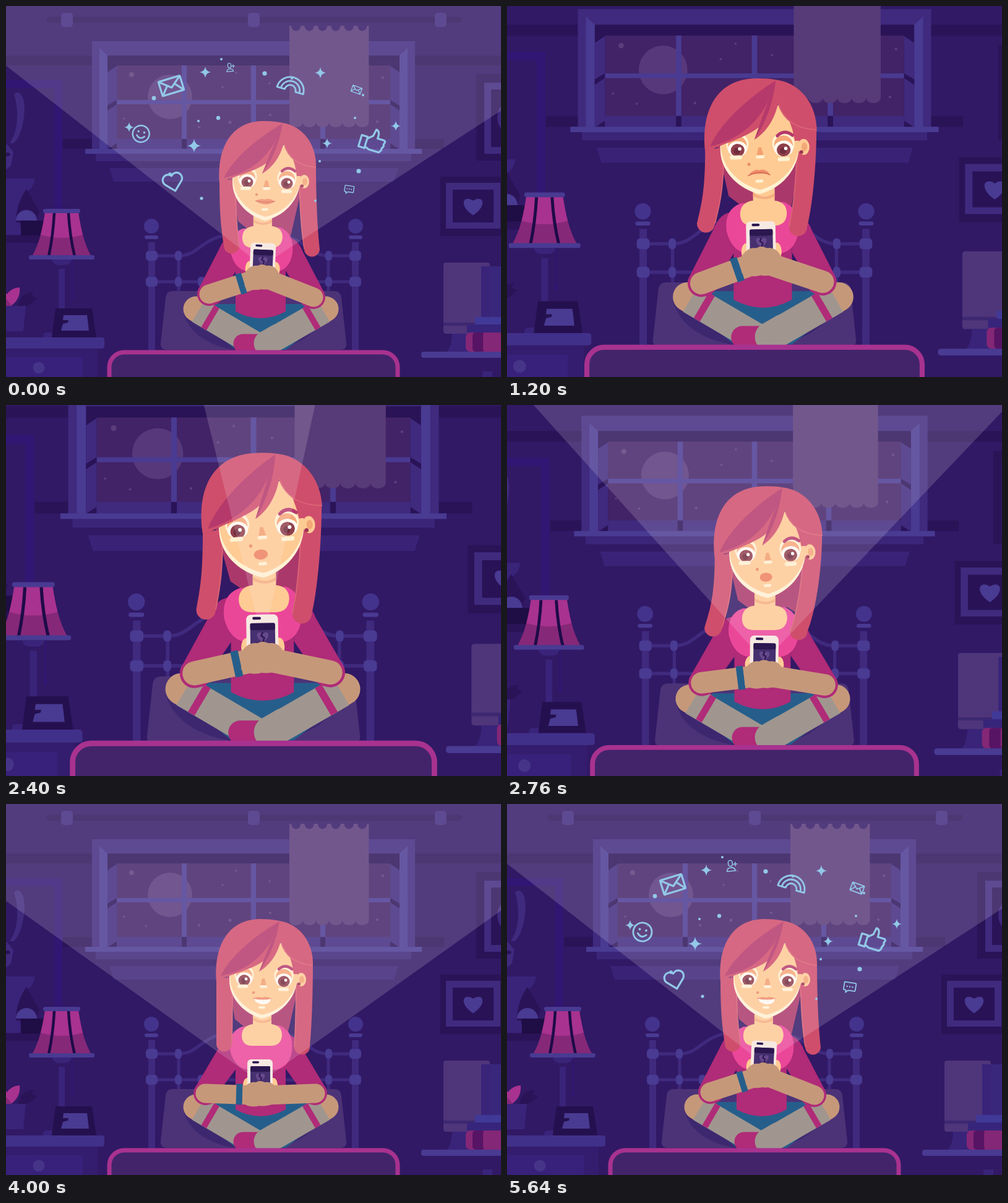
These frames come from a looping animation (800x600 px, 5.68 s). An HTML page with a canvas:

```html
<!DOCTYPE html>
<html lang="en">
<head>
<meta charset="utf-8">
<title>Night scroll</title>
<style>
html,body{margin:0;width:100%;height:100%;overflow:hidden;background:#311864}
canvas{display:block;width:800px;height:600px}
</style>
</head>
<body>
<canvas id="stage" width="800" height="600"></canvas>
<script>
const c = document.getElementById('stage').getContext('2d');
const LOOP = 5680;
const WALL = '#311965', DARK = '#2a1357', TRIM = '#3f2a7e', LIGHT = '#493a92', DIM = '#39247a',
  PINK = '#a8328f', MAGENTA = '#b02b78', SKIN = '#c6987a', FACE = '#ffcb94', CREAM = '#fff2d2',
  HAIR = '#cf4e6c', HAIR_DARK = '#b5396b', TEAL = '#265e8b', GREY = '#a0968f', ICON = '#92c8e8';
let t = 0;

// drawing helpers
const fill = (color, d) => { c.fillStyle = color; c.fill(new Path2D(d)); };
const line = (color, w, d, cap = 'butt') => {
  c.strokeStyle = color; c.lineWidth = w; c.lineCap = cap; c.lineJoin = 'round';
  c.stroke(new Path2D(d));
};
const box = (color, x, y, w, h, r = 0) => {
  c.fillStyle = color; c.beginPath(); c.roundRect(x, y, w, h, r); c.fill();
};
const oval = (color, x, y, rx, ry = rx) => {
  c.fillStyle = color; c.beginPath(); c.ellipse(x, y, rx, ry, 0, 0, 7); c.fill();
};
const group = (x, y, deg, scale, draw) => {
  c.save(); c.translate(x, y); c.rotate(deg * Math.PI / 180); c.scale(scale, scale);
  draw(); c.restore();
};
const mirrored = draw => {
  draw();
  c.save(); c.translate(800, 0); c.scale(-1, 1); draw(); c.restore();
};
const zoom = (s, draw) => group(400, 610, 0, s, () => { c.translate(-400, -610); draw(); });
const ease = (a, b, time = t) => {
  const u = Math.min(1, Math.max(0, (time - a) / (b - a)));
  return u * u * (3 - 2 * u);
};
const HEART = 'M0,14C-24,-2 -15,-19 0,-9C15,-19 24,-2 0,14Z';

// time, head x, head y, head tilt, hand x, hand y, phone tilt, elbows, strand tips
const poses = [
  [0, 0, 0, 0, 413, 440, 2.5, 328, 466, 497, 471, 365, 494],
  [1200, -11, 0, -2.4, 409, 442, -1, 326, 471, 495, 469, 333, 460],
  [1840, -17, 2, -9, 408, 441, -4, 324, 475, 495, 466, 336, 460],
  [2760, 1, -2, -3, 413, 456, .8, 324, 467, 501, 470, 341, 463],
  [4000, -5, 0, 0, 410, 470, 0, 322, 468, 500, 468, 353, 478],
  [5000, -8, 0, -5, 409, 468, 0, 322, 468, 500, 468, 333, 468],
  [5640, 0, 0, 0, 413, 440, 2.5, 328, 466, 497, 471, 365, 494],
  [5680, 0, 0, 0, 413, 440, 2.5, 328, 466, 497, 471, 365, 494]
];
function poseNow() {
  const i = poses.findIndex((p, n) => n && t <= p[0]);
  const [a, b] = [poses[i - 1], poses[i]];
  const u = ease(a[0], b[0]);
  const [, hx, hy, tilt, x, y, turn, lx, ly, rx, ry, tipL, tipR] = a.map((v, n) => v + (b[n] - v) * u);
  return { hx, hy, tilt, x, y, turn, lx, ly, rx, ry, tipL, tipR };
}

function wallAndWindow() {
  box(DARK, -200, 80, 1200, 16);
  box(DARK, 92, 215, 616, 16);
  box('#2b145a', 65, 17, 672, 10, 5);
  for (const x of [98, 400, 702]) box(TRIM, x - 9, 11, 19, 23, 5);

  box(TRIM, 139, 57, 522, 175);
  box(DARK, 164, 80, 472, 152);
  box('#422367', 179, 96, 442, 136);
  oval('#57387a', 265, 147, 36);
  for (const [x, y, r] of [[203, 111, 4], [350, 131, 1.7], [372, 108, 1.7], [426, 125, 1.7], [427, 176, 2],
    [609, 116, 2], [191, 182, 1.7], [226, 197, 1.7], [312, 196, 2], [362, 188, 2.5], [600, 187, 2]])
    oval('#5b3d7b', x, y, r);
  box(TRIM, 179, 215, 442, 17);
  for (const x of [284, 396, 508]) {
    box(LIGHT, x, 96, 8, 119);
    box(DARK, x, 215, 8, 16);
  }
  box(LIGHT, 179, 152, 442, 7);
  mirrored(() => {
    fill(LIGHT, 'M151,68L164,80V232H151Z');
    fill(TRIM, 'M164,107L179,97V222L164,232Z');
    fill(DARK, 'M164,161L179,152V159L164,169Z');
  });
  box('#3b2578', 145, 239, 510, 12);
  box(LIGHT, 128, 231, 544, 8);
  fill('#3a2377', 'M167,262H634L627,284H174Z');

  let blind = 'M458,32';
  for (let i = 0; i < 6; i++) blind += 'h3a7.7,8.5 0 0 0 15.4,0h3';
  blind += 'V188';
  for (let i = 0; i < 6; i++) blind += 'a10.7,8 0 0 1 -21.4,0';
  fill('#573a78', blind + 'Z');
}

function leftSide() {
  fill('#311673', 'M-60,120H91V372H78V133H-60Z');
  box(DARK, -60, 371, 122, 12);
  fill(TRIM, 'M6,222C22,198 20,166 13,143C20,134 30,144 30,166C29,193 22,214 12,222Z');
  fill(TRIM, 'M-40,215L2,224L12,236L8,258L-6,270H-40Z');
  oval(DARK, 2, 240, 5, 3);
  fill(DIM, 'M-40,279H47C45,292 38,298 33,300L20,340L26,370H-40Z');
  fill(DARK, 'M33,296Q42,312 54,332L48,350H16Q16,320 33,296Z');
  fill(LIGHT, 'M16,347a17,17 0 0 1 34,0Z');
  box('#1f0d45', 24, 347, 38, 24);

  fill('#862878', 'M63,334H117C121,360 126,384 138,405H42C54,384 59,360 63,334Z');
  fill(PINK, 'M63,334H117Q120,354 124,370Q90,380 56,370Q60,354 63,334Z');
  line('#1d0b48', 4.5, 'M78,335Q76,372 69,405M101,335Q103,372 111,405');
  box(LIGHT, 60, 328, 60, 7, 3);
  box(LIGHT, 37, 403, 106, 7, 3);
  fill(DIM, 'M74,410H106Q104,419 94,419H86Q76,419 74,410Z');
  box(DIM, 85, 425, 10, 66);
  line('#311673', 2, 'M107,410V462');
  oval('#311673', 107, 468, 2.5, 5);

  fill(DARK, 'M20,485Q24,462 45,463Q36,470 50,472Q40,484 32,485Z');
  fill(PINK, 'M-20,485Q-10,450 2,466Q8,456 22,455Q24,474 8,485Z');
  fill('#862878', 'M-20,485Q-4,462 9,485Z');
  fill(DIM, 'M-20,485H32L28,526H-20Z');
  box(DIM, 60, 528, 24, 12, 5);
  fill('#25104f', 'M80,489H139L146,536H74Z');
  fill(LIGHT, 'M93,500H131L134,525H89L92,514L100,512L101,508H92Z');
  box('#341d6e', -60, 550, 208, 80);
  box('#38217a', -60, 568, 184, 60);
  oval('#463489', 53, 585, 9.5);
  box('#41308a', -60, 536, 219, 18, 4);
}

function rightSide() {
  box(DARK, 760, 110, 140, 140);
  box(TRIM, 773, 124, 120, 115);
  box(DARK, 784, 135, 120, 93);
  oval(TRIM, 812, 180, 18, 24);

  box(DARK, 702, 276, 112, 96);
  box(TRIM, 711, 286, 88, 74);
  box('#291256', 722, 297, 66, 53);
  group(755, 324, 0, 1.03, () => fill(LIGHT, HEART));

  box('#39277b', 768, 421, 50, 84);
  box('#4f357a', 707, 415, 75, 115, 4);
  box(DIM, 768, 421, 14, 85);
  box('#3d2871', 707, 512, 62, 5);
  box('#413997', 758, 503, 80, 13);
  box('#37257b', 745, 515, 80, 14);
  fill(DIM, 'M721,530H748V560H712Q721,550 721,530Z');
  box('#842776', 743, 528, 90, 31, 7);
  box('#571464', 754, 528, 20, 31, 5);
  box('#842776', 771, 528, 60, 31, 5);
  box(LIGHT, 671, 559, 190, 10, 4);
  box(DIM, 770, 591, 16, 20);
}

function bed() {
  mirrored(() => {
    line(TRIM, 5, 'M240,404H279C312,404 314,376 360,370H402M240,446H402M279,404V470M316,446V470');
    box(TRIM, 230, 382, 11, 190);
    box(LIGHT, 224, 371, 22, 6, 3);
    oval('#43338c', 235, 356, 12);
    for (const y of [396, 438]) {
      box(LIGHT, 226, y, 19, 16, 5);
      box(LIGHT, 273, y, 11, 16, 5);
    }
    box(LIGHT, 310, 438, 12, 16, 5);
  });
  fill('#4c3377', 'M270,461H530Q541,461 542,472L550,545Q551,556 540,556H260Q249,556 250,545L258,472Q259,461 270,461Z');
}

function legs() {
  mirrored(() => fill('#3d2870', 'M287,496Q300,546 378,558L380,540Z'));
  fill(TEAL, 'M340,482H484L505,515L452,556H372L320,515Z');
  line(SKIN, 41, 'M307,490L326,501', 'round');
  line(GREY, 41, 'M311,493L425,560');
  line(MAGENTA, 41, 'M326,501.5L334.5,506.5');
  line(MAGENTA, 31, 'M383,546H420', 'round');
  line(SKIN, 41, 'M517,490L500,500', 'round');
  line(GREY, 41, 'M440,534.5L421,545.5', 'round');
  line(GREY, 41, 'M513,493L421,546');
  line(MAGENTA, 41, 'M498,501.5L489.5,506.5');
}

function torso(p) {
  const dx = (p.hx + 17) / 6;
  fill(MAGENTA, 'M371,388V494Q412,516 452,494V388Z');
  fill(MAGENTA, `M368,372Q352,374 344,394L${p.lx - 17},${p.ly - 8}L${p.lx + 14},${p.ly + 8}L372,428Z`);
  fill(MAGENTA, `M452,372Q472,376 480,398L${p.rx + 17},${p.ry - 8}L${p.rx - 14},${p.ry + 8}L452,428Z`);
  group(dx, 0, 0, 1, () => {
    fill('#eb4799', 'M380,360Q357,368 360,398Q368,432 398,430H424Q455,432 460,400Q464,368 440,358Z');
    fill(FACE, 'M397,335H427V356Q444,358 444,374Q443,391 426,391H396Q379,391 379,374Q380,358 397,356Z');
    fill('#f5ae7f', 'M397,345Q414,356 427,345V350Q414,358 397,350Z');
  });
}

function headPoint(p, x, y) {
  const a = p.tilt * Math.PI / 180, u = x - 418, v = y - 345;
  return [418 + p.hx + u * Math.cos(a) - v * Math.sin(a), 345 + p.hy + u * Math.sin(a) + v * Math.cos(a)];
}
function strand(p, out, inn, tip, y, side) {
  const [ax, ay] = headPoint(p, ...out), [bx, by] = headPoint(p, ...inn);
  const o = tip - 13 * side, i = tip + 12 * side;
  const inner = `C${(i + bx) / 2},${y - 25} ${bx},${by + 60} ${bx},${by}`;
  fill(HAIR, `M${ax},${ay}C${ax},${ay + 60} ${(o + ax) / 2},${y - 25} ${o},${y}A12.5,12.5 0 0 ${side > 0 ? 0 : 1} ${i},${y}${inner}Z`);
  line('#da6474', 1.5, `M${i},${y}${inner}`);
}

function eye(x, y) {
  oval(CREAM, x, y - 8, 15.5, 16);
  oval('#f6a878', x, y - 6, 13, 13);
  c.save();
  c.beginPath(); c.ellipse(x, y - 1, 13.5, 11, 0, 0, 7); c.clip();
  oval('#fffaf2', x, y - 1, 13.5, 11);
  oval('#8f3f4b', x, y + 1, 9.5, 9);
  oval('#6f2c3c', x - 1, y + 2, 4.5);
  c.restore();
  oval('#fff', x + 3, y - 1, 2.4);
}

function mouth() {
  const lip = '#f08e6b';
  if (t < 250) {
    fill(lip, 'M403,315Q411,311 418,313Q425,310 435,316Q428,321 419,321Q409,320 403,315Z');
    line('#cf6653', 1.2, 'M403,315Q419,319 435,316');
  } else if (t < 2400) {
    fill(lip, 'M403,321Q409,313 416,313L419,314L422,313Q430,313 434,321Q427,318 419,319Q411,318 403,321Z');
    line('#cf6653', 1.2, 'M403,321Q419,313 434,321');
  } else if (t < 3350) {
    oval('#ee8260', 417, 317, 9, 6.5);
  } else {
    fill(lip, 'M404,314Q412,311 419,313Q427,310 435,315L432,319H407Z');
    fill('#fffaf2', 'M405,315Q420,318 434,315Q431,324 420,324Q409,323 405,315Z');
  }
}

function head(p) {
  strand(p, [345, 282], [371, 280], p.tipL, 388, 1);
  strand(p, [501, 256], [474, 262], p.tipR, 393, -1);
  group(418 + p.hx, 345 + p.hy, p.tilt, 1, () => {
    c.translate(-418, -345);
    const face = 'M366,225V285C366,316 392,340 418,347C446,341 474,318 476,280V225Z';
    fill(CREAM, face);
    c.save();
    c.clip(new Path2D(face));
    c.translate(1, -6);
    fill(FACE, face);
    c.restore();
    fill(HAIR, 'M445,215Q466,240 470,275L488,275L501,258Z');
    oval(FACE, 482, 284, 8, 11);
    oval('#f3a878', 483, 284, 4, 6);
    oval('#a03453', 478.5, 291, 2.6);
    eye(390, 284);
    eye(454, 286);
    line(HAIR_DARK, 4.5, 'M446,267Q456,258 467,267', 'round');
    fill('#f3a06e', 'M419,282H423L426,294H416Z');
    box(CREAM, 415, 293, 12, 4.5, 2);
    box(CREAM, 379, 292, 17, 5.5, 2.5);
    box(CREAM, 445, 297, 17, 5.5, 2.5);
    box(CREAM, 413, 327, 11, 4, 2);
    oval('#e88c64', 405, 305, 2.2);
    mouth();
    fill(HAIR, 'M345,286C341,232 362,187 415,186Q434,186 447,189C480,194 503,225 501,262C478,260 456,250 449,222C443,245 430,262 414,271L421,254C402,268 372,274 345,286Z');
    fill(HAIR_DARK, 'M447,190C405,214 366,248 352,278C392,270 430,246 447,190Z');
    fill(HAIR_DARK, 'M447,190Q440,235 414,271L424,246Z');
    line('#da6474', 1.5, 'M449,222C456,249 478,259 501,261');
  });
}

function backHair(p) {
  group(418 + p.hx, 345 + p.hy, p.tilt, 1, () => {
    c.translate(-418, -345);
    fill('#ab386b', 'M362,278L375,348L392,362H446L460,372L480,285Z');
  });
}

function phoneAndHands(p) {
  group(p.x, p.y, p.turn, 1, () => {
    oval(FACE, -20, -15, 7, 12);
    oval(FACE, 22, -15, 7, 12);
    box('#f6e9e2', -20, -57, 41, 66, 6);
    box('#46306f', -15, -46, 32, 50, 2);
    box('#2c1750', -15, -46, 32, 9, 2);
    box('#2c1750', -12, -54, 11, 3.5, 1.7);
    group(1, -28, 0, .5, () => {
      fill('#66488c', HEART);
      line('#2c1750', 4, 'M0,-12L-4,-3L4,2L0,14');
    });
  });
  const { x, y, lx, ly, rx, ry } = p;
  line(MAGENTA, 38, `M${lx},${ly}l4,-1`, 'round');
  line(MAGENTA, 38, `M${rx},${ry}l-4,-1`, 'round');
  line(SKIN, 31, `M${lx},${ly}L${x - 8},${y + 1}`, 'round');
  line(SKIN, 31, `M${rx},${ry}L${x + 8},${y + 1}`, 'round');
  group(x - 33, y + (ly - y) * .35, Math.atan2(y - ly, x - lx) * 180 / Math.PI, 1, () => box(TEAL, -5, -17, 10, 34, 1));
  fill(SKIN, `M${x - 28},${y - 6}Q${x - 20},${y - 22} ${x - 6},${y - 20}Q${x},${y - 24} ${x + 8},${y - 20}Q${x + 24},${y - 22} ${x + 29},${y - 4}L${x + 26},${y + 14}Q${x + 8},${y + 20} ${x},${y + 18}Q${x - 16},${y + 22} ${x - 27},${y + 14}Z`);
}

function beam(p, scale) {
  const opening = t < 1500 ? 1 - ease(80, 880) : 1 - Math.pow(1 - Math.min(1, Math.max(0, (t - 2300) / 1150)), 3);
  if (opening <= 0) return;
  const x = 400 + (p.x + 1 - 400) * scale, y = 610 - (630 - p.y) * scale;
  const edge = side => {
    const a = (p.turn + side * 54.5 * opening) * Math.PI / 180;
    return `${x + 1500 * Math.sin(a)},${y - 1500 * Math.cos(a)}`;
  };
  fill('rgba(250,238,248,.165)', `M${x},${y}L${edge(-1)}L${x},-1500L${edge(1)}Z`);
}

const ink = (d, w = 3.2) => line(ICON, w, d, 'round');
const shapes = {
  mail: () => ink('M-17,-12H17Q18,-12 18,-11V11Q18,12 17,12H-17Q-18,12 -18,11V-11Q-18,-12 -17,-12ZM-17,-11L0,3L17,-11M-17,11L-6,-2M17,11L6,-2'),
  person: () => ink('M-3,-16a6,6 0 0 1 6,6v5a6,6 0 0 1 -12,0v-5a6,6 0 0 1 6,-6ZM-15,15Q-14,5 -3,5Q8,5 10,15ZM11,-9V1M6,-4H16', 2.8),
  rainbow: () => ink('M-22,11A22,22 0 0 1 22,11H9A9,9 0 0 0 -9,11ZM-15.5,11A15.5,15.5 0 0 1 15.5,11', 2.8),
  smile: () => {
    ink('M17,0A17,17 0 1 1 -17,0A17,17 0 1 1 17,0ZM-8,4Q0,13 8,4');
    oval(ICON, -6, -4, 2.2); oval(ICON, 6, -4, 2.2);
  },
  thumb: () => ink('M-20,-3H-10V16H-20ZM-10,0L-2,-7L0,-18Q7,-18 6,-5H17Q21,-4 18,1Q20,5 17,8Q18,12 14,16H-3L-10,13'),
  chat: () => {
    ink('M-15,-13H15Q17,-13 17,-11V8Q17,10 15,10H-3L-10,17V10H-15Q-17,10 -17,8V-11Q-17,-13 -15,-13Z');
    for (const x of [-8, 0, 8]) oval(ICON, x, -1, 2.2);
  },
  heart: () => ink('M0,15L-14,1A8.5,8.5 0 0 1 0,-10A8.5,8.5 0 0 1 14,1Z')
};
// shape, tilt, place, later place, hide time
const icons = [
  ['mail', -17, 284, 144, 268, 130, 5800], ['person', -6, 368, 111, 363, 100, 5420],
  ['rainbow', 16, 459, 141, 462, 127, 5850], ['mail', 20, 558, 144, 566, 136, 5420],
  ['thumb', 17, 571, 228, 592, 218, 5780], ['chat', 9, 544, 289, 554, 296, 5420],
  ['heart', -14, 287, 277, 271, 284, 5820], ['smile', 12, 232, 211, 219, 207, 5540]
];
// x, y, size, show time
const sparkles = [[322, 107, 9, 4700], [199, 196, 8, 4300], [304, 226, 11, 3980],
  [508, 108, 9, 4960], [519, 222, 8, 5080], [630, 194, 8, 5150]];
const dots = [[348, 86, 2, 4000], [418, 109, 3.6, 4700], [462, 117, 2, 4500], [570, 267, 3.6, 4400], [507, 251, 2, 4300],
  [500, 315, 2, 4300], [239, 149, 3.4, 5060], [311, 186, 2, 5100], [343, 181, 3.2, 5080], [577, 144, 2, 5200],
  [564, 181, 2, 5150], [316, 311, 2.6, 5080], [265, 272, 2.8, 5200]];

function floatingIcons() {
  const now = t < 1200 ? t + LOOP : t;
  const size = (show, hide, d = 300) => ease(show, show + d, now) * (1 - ease(hide, hide + 480, now));
  for (const [x, y, r, show] of sparkles) group(x, y, 0, r * size(show, 5760), () =>
    fill(ICON, 'M0,-1Q.12,-.12 1,0Q.12,.12 0,1Q-.12,.12 -1,0Q-.12,-.12 0,-1Z M-.3,0L0,-.3L.3,0L0,.3Z'));
  for (const [x, y, r, show] of dots) oval(ICON, x, y, r * size(show, 5760));
  icons.forEach(([name, tilt, x, y, x2, y2, hide], i) => {
    const s = size(4200 + i * 60, hide), u = (now - 5000) / 640;
    if (s > 0) group(x + (x2 - x) * u, y + (y2 - y) * u, tilt, s, shapes[name]);
  });
}

function frame(ms) {
  t = ms % LOOP;
  const p = poseNow();
  const push = .176 * (ease(215, 2100) - ease(2100, 3275));
  const near = 1 + 1.73 * push;
  box(WALL, 0, 0, 800, 600);
  zoom(1 + push, () => { wallAndWindow(); leftSide(); rightSide(); bed(); });
  zoom(near, () => { legs(); backHair(p); torso(p); head(p); });
  beam(p, near);
  zoom(near, () => {
    phoneAndHands(p);
    c.beginPath(); c.roundRect(167, 560, 466, 120, 24);
    c.fillStyle = '#43246b'; c.fill();
    c.strokeStyle = PINK; c.lineWidth = 7; c.stroke();
  });
  floatingIcons();
}

const start = performance.now();
function tick() {
  frame(performance.now() - start);
  requestAnimationFrame(tick);
}
tick();
</script>
</body>
</html>
```
